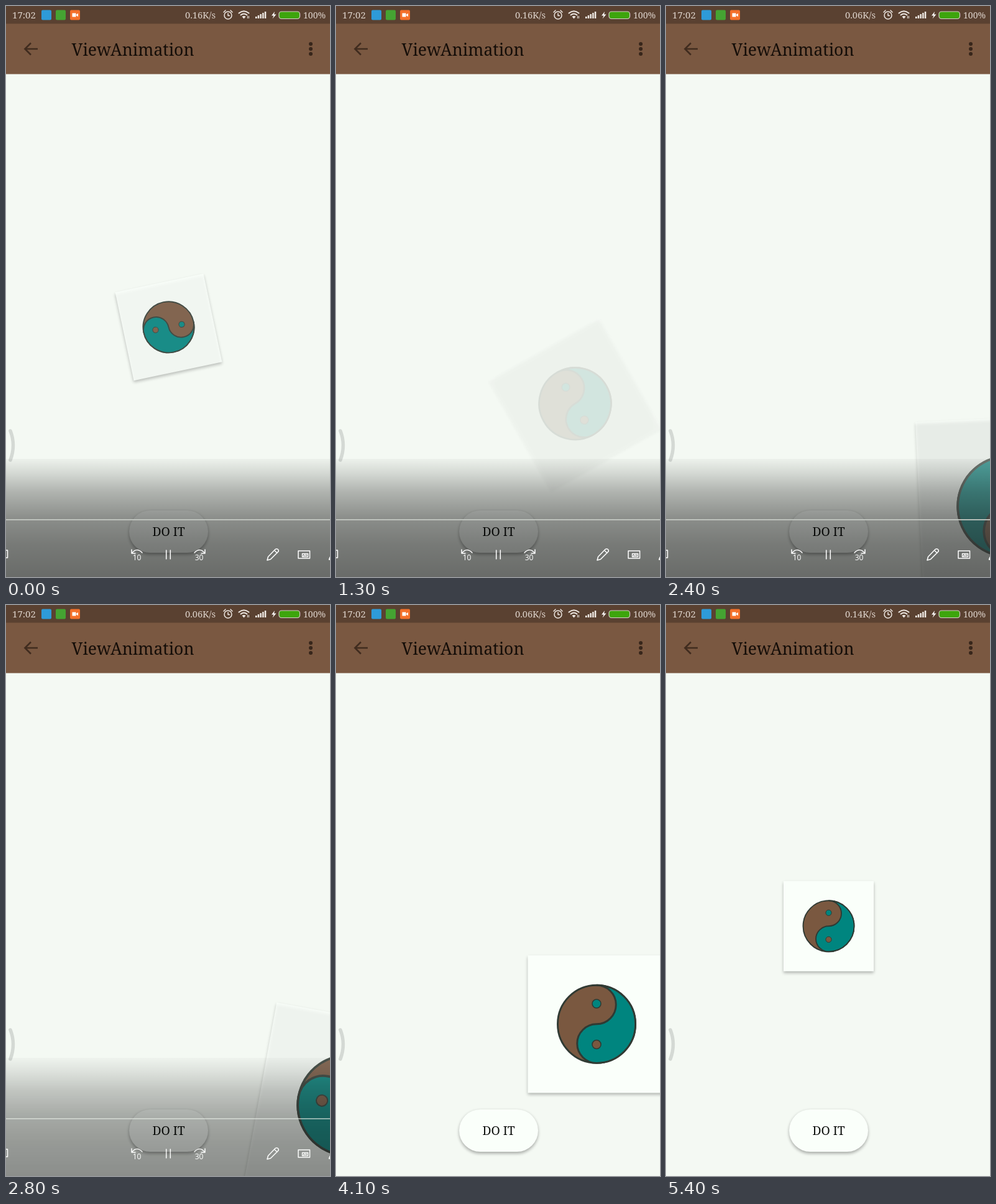
Recreate the animation shown at these times as an HTML page. Size 521 by 918 pixels, loop 5.6 s.

```html
<!DOCTYPE html>
<html lang="en">
<head>
<meta charset="utf-8">
<title>ViewAnimation</title>
<style>
html, body { margin: 0; width: 100%; height: 100%; overflow: hidden; background: #f4f9f3; }
svg { display: block; width: 521px; height: 918px; }
text { font-family: "Noto Serif", serif; font-weight: 300; }
.line { fill: none; stroke-linecap: round; stroke-linejoin: round; }
</style>
</head>
<body>
<svg viewBox="0 0 521 918" xmlns="http://www.w3.org/2000/svg">
  <defs>
    <filter id="soft" x="-20%" y="-20%" width="140%" height="140%">
      <feGaussianBlur stdDeviation="2.8"/>
    </filter>
    <linearGradient id="shade" x1="0" y1="0" x2="0" y2="1">
      <stop offset="0" stop-opacity=".03"/>
      <stop offset=".12" stop-opacity=".13"/>
      <stop offset=".28" stop-opacity=".28"/>
      <stop offset=".5" stop-opacity=".43"/>
      <stop offset=".72" stop-opacity=".51"/>
      <stop offset="1" stop-opacity=".57"/>
    </linearGradient>
  </defs>

  <rect width="521" height="918" fill="#f4f9f3"/>

  <!-- button -->
  <rect x="198" y="813" width="127" height="69" rx="34" fill="#000" opacity=".3" filter="url(#soft)"/>
  <rect x="198" y="811" width="127" height="68" rx="34" fill="#fafffa"/>
  <text x="261.5" y="852" font-size="19.3" text-anchor="middle" fill="#0c0f0c">DO IT</text>

  <!-- moving card -->
  <g id="shadow" filter="url(#soft)">
    <rect id="shadowBox" x="-72.5" y="-72.5" width="145" height="145"/>
  </g>
  <g id="card">
    <rect x="-72.5" y="-72.5" width="145" height="145" fill="#fafffa"/>
    <g stroke="#303a33" stroke-width="1.9">
      <circle r="41" fill="#7a5840"/>
      <path d="M0-41A41 41 0 0 1 0 41A20.5 20.5 0 0 1 0 0A20.5 20.5 0 0 0 0-41Z" fill="#00857f"/>
      <g stroke-width="1">
        <circle cy="-21.5" r="4.6" fill="#00857f"/>
        <circle cy="21.5" r="4.6" fill="#7a5840"/>
      </g>
    </g>
  </g>

  <path class="line" d="M7 683Q16 706 7 730" stroke="#d4d9d4" stroke-width="5.5"/>

  <!-- toolbar -->
  <rect y="28" width="521" height="81.5" fill="#7a5841"/>
  <path class="line" d="M51 69H31M40 59.500L30.500 69L40 78.500" stroke="#402c1f" stroke-width="2.6" style="stroke-linecap:butt;stroke-linejoin:miter"/>
  <text x="105.500" y="80" font-size="26.5" fill="#140d08">ViewAnimation</text>
  <g fill="#37261b">
    <circle cx="490" cy="61" r="3"/><circle cx="490" cy="69" r="3"/><circle cx="490" cy="77" r="3"/>
  </g>

  <!-- status bar -->
  <rect width="521" height="28.500" fill="#5a4131"/>
  <g fill="#ddd3cb">
    <text x="10" y="20" font-size="15">17:02</text>
    <text id="speed" x="288" y="20" font-size="14.6"></text>
    <text x="478" y="20" font-size="14">100%</text>
  </g>
  <rect x="57" y="6.500" width="16" height="16" rx="2" fill="#2e9bd8"/>
  <rect x="80" y="6.500" width="16" height="16" rx="2" fill="#45a332"/>
  <rect x="103" y="6.500" width="16" height="16" rx="2" fill="#f4702a"/>
  <path d="M106.500 11.500h6v6h-6zM113 13.800l3-2v5.500l-3-2z" fill="#fff"/>
  <g class="line" stroke="#eee8e3" stroke-width="1.5">
    <circle cx="357" cy="15" r="6"/>
    <path d="M357 12v3.500h2.500M350 10l3-3M364 10l-3-3"/>
    <path d="M374.500 11.500Q382.500 5 390.500 11.500M377.500 14.500Q382.500 10.500 387.500 14.500" stroke-width="2"/>
  </g>
  <path d="M379.500 17Q382.500 14.800 385.500 17L382.500 20.500ZM388 16h1v4h-1zM390 16h1v4h-1z" fill="#eee8e3"/>
  <path d="M401 17h2.500v3H401zM404.700 15h2.500v5h-2.500zM408.400 13h2.500v7h-2.500zM412.100 11h2.500v9h-2.500zM415.800 9h2.500v11h-2.500z" fill="#eee8e3"/>
  <path d="M432 9L427 15.500H430.500L428.500 20.500L434.500 13.500H431Z" fill="#fff"/>
  <rect x="439" y="9" width="33.500" height="11.500" rx="4" fill="#3da50c" stroke="#d5d0c5" stroke-width="1.2"/>

  <!-- player controls -->
  <g id="controls">
    <rect y="728" width="521" height="190" fill="url(#shade)"/>
    <rect y="825" width="521" height="1.800" fill="#c2c7c1"/>
    <g class="line" stroke="#fff" stroke-width="1.500">
      <path d="M202 874V880H208M202.500 879.500Q210 870 219 879"/>
      <path d="M320 874V880H314M319.500 879.500Q312 870 303 879"/>
      <path d="M257.700 875V889M264.300 875V889"/>
      <path d="M420 891L421.500 885.500L433 873.500Q436 871.500 438 874.500Q439 876.500 437 878L425.500 889.500ZM431.500 875L436 879.500"/>
      <rect x="470" y="876" width="18.500" height="12"/>
      <rect x="476.500" y="880.500" width="9" height="5"/>
      <path d="M478.500 884l2-2l1.500 1.500l1.500-1"/>
      <path d="M0 875H2.500V887H0M521 886L519.500 890H521"/>
    </g>
    <g fill="#fff" font-size="12" text-anchor="middle">
      <text x="210.500" y="890.500" style="font-family:'Open Sans',sans-serif;font-weight:400">10</text>
      <text x="310.500" y="890.500" style="font-family:'Open Sans',sans-serif;font-weight:400">30</text>
    </g>
  </g>
</svg>
<script>
const LOOP = 5600, STEP = 100, LAST = 5400;
const $ = id => document.getElementById(id);
const clamp = v => Math.max(0, Math.min(1, v));
const ramp = (t, from, to) => clamp((t - from) / (to - from));

const [shadow, shadowBox, card, controls, speed] =
  ["shadow", "shadowBox", "card", "controls", "speed"].map($);

function draw(t) {
  // one turn while fading out, then the same turn back while fading in
  const turn = t < 1452 ? ramp(t, -402, 1452) : 1 - ramp(t, 1452, 3321);
  const alpha = 1 - Math.pow(turn, 1.3);
  // slide and growth share one progress, with a hold at the far end
  const move = 0.96 * (ramp(t, 485, 2394) - ramp(t, 3235, 5144));
  const x = 261.5 + 300 * move, y = 516.3 + 300 * move;
  const pose = `rotate(${turn * 360}) scale(${1 + move})`;

  card.setAttribute("transform", `translate(${x} ${y}) ${pose}`);
  card.setAttribute("opacity", alpha);
  shadow.setAttribute("transform", `translate(${x} ${y + 2.8})`);
  shadow.setAttribute("opacity", alpha * 0.27);
  shadowBox.setAttribute("transform", pose);

  controls.setAttribute("opacity", 1 - ramp(t, 2700, 3100));
  speed.textContent = (t < 1600 ? "0.16" : t < 5100 ? "0.06" : "0.14") + "K/s";
}

const start = performance.now();
function tick() {
  const t = (performance.now() - start) % LOOP;
  draw(Math.min(LAST, Math.floor(t / STEP) * STEP));
  requestAnimationFrame(tick);
}
tick();
</script>
</body>
</html>
```
